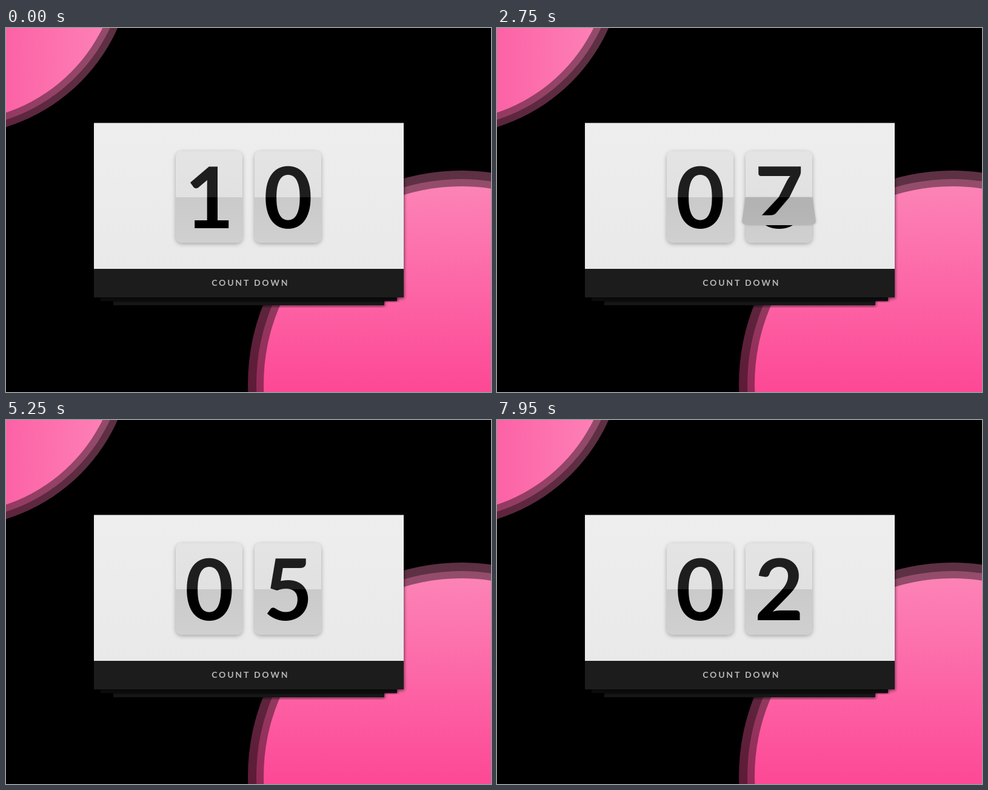
An HTML page for the animation above (8 s loop, 800 px wide and 600 px high).

```html
<!DOCTYPE html>
<html lang="en">
<head>
<meta charset="utf-8">
<title>Count down</title>
<style>
  html, body { margin: 0; width: 100%; height: 100%; overflow: hidden; background: #000; }
  #stage { position: absolute; left: 0; top: 0; width: 800px; height: 600px; overflow: hidden; }
  #scene { position: absolute; left: 0; top: 0; }
  .card {
    position: absolute; top: 203px; width: 110px; height: 151px; border-radius: 10px;
    box-shadow: 0 2px 7px rgba(0, 0, 0, .3);
    perspective: 600px; perspective-origin: 50% 0;
  }
  .half { position: absolute; left: 0; width: 110px; overflow: hidden; }
  .half text { font: 700 140px Lato, sans-serif; text-anchor: middle; }
  .top {
    top: 0; height: 76px; border-radius: 10px 10px 0 0; transform-origin: 50% 100%;
    background: linear-gradient(#e4e4e4, #e1e1e1); fill: #1e1e1e;
  }
  .bottom {
    top: 76px; height: 75px; border-radius: 0 0 10px 10px; transform-origin: 50% 0;
    background: linear-gradient(#cacaca, #d0d0d0); fill: #000;
  }
  .flap { box-shadow: 0 0 4px rgba(0, 0, 0, .18); }
</style>
</head>
<body>
<div id="stage">
  <svg id="scene" width="800" height="600" viewBox="0 0 800 600">
    <defs>
      <linearGradient id="pinkA" gradientUnits="userSpaceOnUse" x1="0" y1="0" x2="160" y2="0">
        <stop offset="0" stop-color="#fc62a6"/><stop offset="1" stop-color="#fd80b6"/>
      </linearGradient>
      <linearGradient id="pinkB" gradientUnits="userSpaceOnUse" x1="0" y1="261" x2="0" y2="600">
        <stop offset="0" stop-color="#fc83b6"/><stop offset="1" stop-color="#fd4896"/>
      </linearGradient>
      <linearGradient id="paper" x1="0" y1="0" x2="0" y2="1">
        <stop offset="0" stop-color="#eeeeee"/><stop offset="1" stop-color="#e9e9e9"/>
      </linearGradient>
      <filter id="shadow" x="-10%" y="-10%" width="120%" height="130%">
        <feDropShadow dx="1" dy="2" stdDeviation="2.5" flood-color="#000" flood-opacity=".55"/>
      </filter>
    </defs>
    <rect width="800" height="600"/>
    <g fill="url(#pinkA)">
      <circle cx="-88" cy="-121.5" r="298" opacity=".37"/>
      <circle cx="-88" cy="-121.5" r="286.5" opacity=".34"/>
      <circle cx="-88" cy="-121.5" r="275.5"/>
    </g>
    <g fill="url(#pinkB)">
      <circle cx="751" cy="587" r="352" opacity=".37"/>
      <circle cx="751" cy="587" r="338" opacity=".34"/>
      <circle cx="751" cy="587" r="326"/>
    </g>
    <rect x="177" y="440" width="447" height="17" fill="#121212" filter="url(#shadow)"/>
    <rect x="156" y="440" width="489" height="10" fill="#0c0c0c" filter="url(#shadow)"/>
    <rect x="145" y="157" width="511" height="287" fill="#1f1f1f" filter="url(#shadow)"/>
    <rect x="145" y="156.5" width="511" height="240.5" fill="url(#paper)"/>
    <text x="339.2" y="424.5" fill="#b6b6b6" font-family="Lato, sans-serif" font-size="14" font-weight="700" letter-spacing="2.8">COUNT DOWN</text>
  </svg>
</div>
<script>
const LOOP = 8000, PERIOD = 1000, START = 450, FLIP = 350;
const stage = document.getElementById('stage');
const NS = 'http://www.w3.org/2000/svg';

function makeHalf(card, kind, flap) {
  const svg = document.createElementNS(NS, 'svg');
  const text = document.createElementNS(NS, 'text');
  svg.setAttribute('class', 'half ' + kind + (flap ? ' flap' : ''));
  text.setAttribute('x', 55.3);
  text.setAttribute('y', kind === 'top' ? 126.5 : 50.5);
  svg.append(text);
  card.append(svg);
  return { svg, set(digit) { if (text.textContent !== digit) text.textContent = digit; } };
}

function makeCard(x) {
  const el = document.createElement('div');
  el.className = 'card';
  el.style.left = x + 'px';
  stage.append(el);
  return {
    top: makeHalf(el, 'top'),
    bottom: makeHalf(el, 'bottom'),
    front: makeHalf(el, 'top', true),
    back: makeHalf(el, 'bottom', true)
  };
}

const cards = [makeCard(280), makeCard(410)];

// The flap starts slowly and drops faster and faster.
const fall = t => 0.3 * t + 0.7 * t ** 4;

function turn(flap, visible, angle, shade) {
  const s = flap.svg.style;
  s.visibility = visible ? 'visible' : 'hidden';
  s.transform = `rotateX(${angle}deg)`;
  s.filter = `brightness(${1 - shade})`;
}

function drawCard(card, from, to, angle) {
  const moving = from !== to && angle > 0 && angle < 180;
  const done = angle >= 180;
  card.top.set(angle > 0 ? to : from);
  card.bottom.set(done ? to : from);
  card.front.set(from);
  card.back.set(to);
  const lift = Math.min(angle, 180 - angle);
  const shade = 0.03 * Math.sqrt(Math.max(0, lift));
  turn(card.front, moving && angle < 90, -angle, shade);
  turn(card.back, moving && angle >= 90, 180 - angle, shade / 2);
}

function draw(time) {
  const step = Math.floor(time / PERIOD);
  const t = Math.min(1, Math.max(0, (time % PERIOD - START) / FLIP));
  const angle = 180 * fall(t);
  const digits = n => String(n).padStart(2, '0');
  const from = digits(10 - step), to = digits(9 - step);
  cards.forEach((card, i) => drawCard(card, from[i], to[i], angle));
}

const begin = performance.now();
function tick() {
  draw((performance.now() - begin) % LOOP);
  requestAnimationFrame(tick);
}
tick();
</script>
</body>
</html>
```
